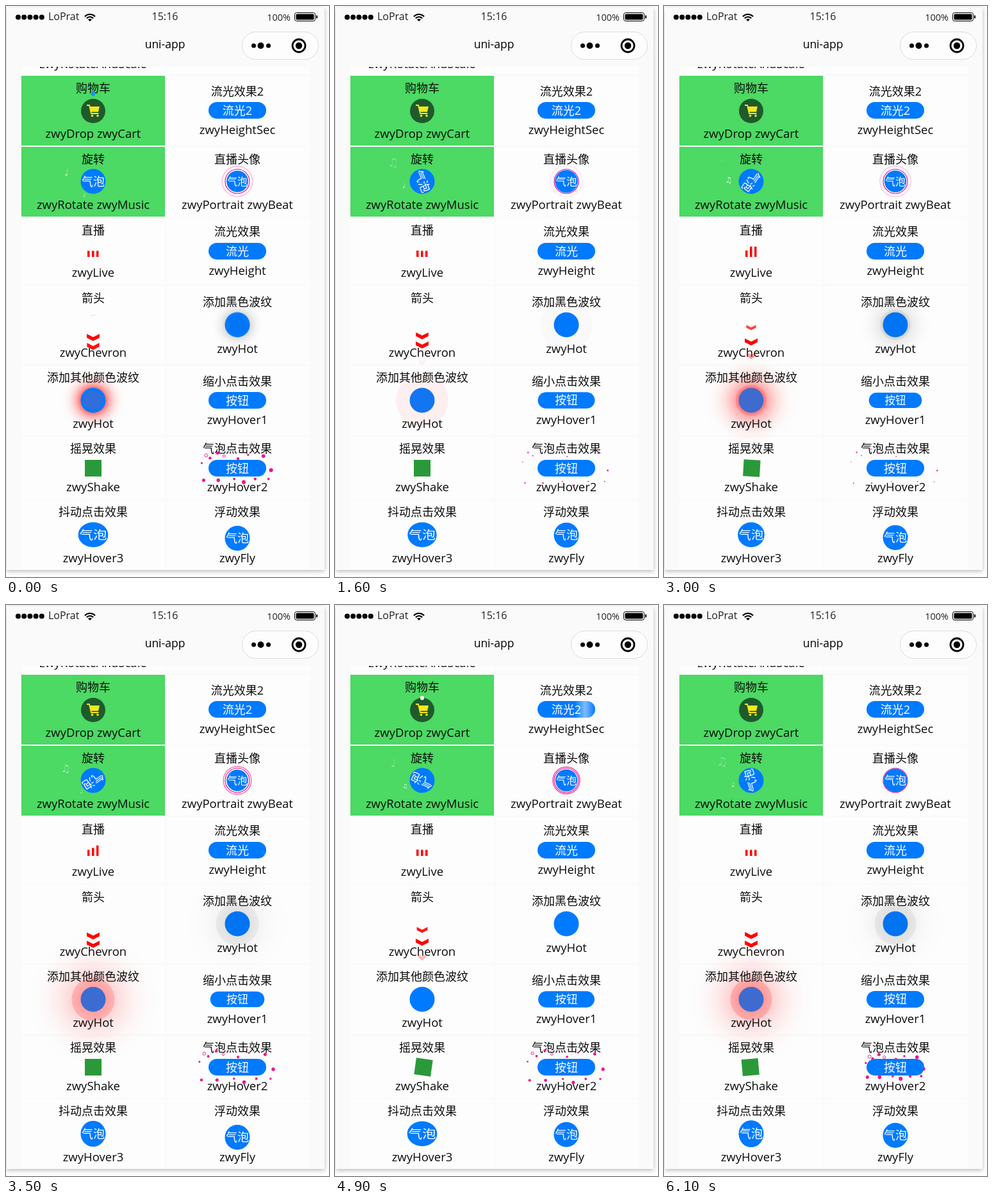
An HTML page with a canvas that plays this animation: 504x892 px, repeating every 6.2 s.

```html
<!DOCTYPE html>
<html lang="zh-CN">
<head>
<meta charset="utf-8">
<title>uni-app</title>
<style>
html, body { margin: 0; width: 100%; height: 100%; overflow: hidden; background: #fff; }
canvas { display: block; }
</style>
</head>
<body>
<canvas id="stage" width="504" height="892"></canvas>
<script>
const g = document.getElementById('stage').getContext('2d');
const LOOP = 6200, STEP = 100, TAU = Math.PI * 2;
const BLUE = '#007aff', RED = '#f00', PINK = '#f0148c', LEFT = 136, RIGHT = 361;
const FONT = '"Open Sans", "Noto Sans CJK SC", "Noto Sans CJK", sans-serif';

// title, title y, caption, caption y
const leftCells = [
  ['购物车', 128, 'zwyDrop zwyCart', 200],
  ['旋转', 239, 'zwyRotate zwyMusic', 311],
  ['直播', 350, 'zwyLive', 417],
  ['箭头', 456, 'zwyChevron', 542],
  ['添加其他颜色波纹', 580, 'zwyHot', 653],
  ['摇晃效果', 691, 'zwyShake', 752],
  ['抖动点击效果', 790, 'zwyHover3', 863]
];
const rightCells = [
  ['流光效果2', 133, 'zwyHeightSec', 194],
  ['直播头像', 239, 'zwyPortrait zwyBeat', 311],
  ['流光效果', 352, 'zwyHeight', 414],
  ['添加黑色波纹', 462, 'zwyHot', 536],
  ['缩小点击效果', 586, 'zwyHover1', 647],
  ['气泡点击效果', 691, 'zwyHover2', 752],
  ['浮动效果', 790, 'zwyFly', 863]
];
const rowEdges = [109, 220, 331, 437, 562, 673, 772, 883];

// bubble x, y, relative size
const bubbles = [
  [312, 702, -1], [318, 706, .8], [330, 698, .9], [340, 703, -.8], [362, 707, .8],
  [378, 701, .6], [402, 703, 1], [414, 725, 1.1], [410, 739, .7], [389, 739, .8],
  [371, 744, 1.1], [356, 739, .7], [331, 741, 1], [308, 741, .9], [305, 714, .6]
];

const clamp = x => Math.min(1, Math.max(0, x));
const mix = (a, b, x) => a + (b - a) * x;
const easeOut = x => 1 - (1 - x) ** 1.7;
const phase = (t, period, offset = 0) => (t / period + offset) % 1;

function text(s, x, y, size = 18, color = '#0c0c0c', align = 'center', family = FONT) {
  g.font = `${size}px ${family}`;
  g.textAlign = align;
  g.fillStyle = color;
  g.fillText(s, x, y);
}
function disc(x, y, r, color) {
  g.fillStyle = color;
  g.beginPath();
  g.arc(x, y, Math.max(0, r), 0, TAU);
  g.fill();
}
function ring(x, y, r, width, color) {
  g.strokeStyle = color;
  g.lineWidth = width;
  g.beginPath();
  g.arc(x, y, r, 0, TAU);
  g.stroke();
}
function box(x, y, w, h, color, r = 0) {
  g.fillStyle = color;
  g.beginPath();
  g.roundRect(x, y, w, h, r);
  g.fill();
}
function path(points, closed) {
  g.beginPath();
  points.forEach(p => g.lineTo(...p));
  if (closed) g.closePath();
}
function at(x, y, draw, sx = 1, sy = sx, angle = 0) {
  g.save();
  g.translate(x, y);
  g.rotate(angle);
  g.scale(sx, sy);
  draw();
  g.restore();
}
function badge() {
  disc(0, 0, 19.5, BLUE);
  text('气泡', 0, 6.5, 18, '#fff');
}
function button(label, y, scale = 1) {
  at(RIGHT, y, () => {
    box(-45, -13, 90, 26, BLUE, 13);
    text(label, 0, 6.5, 18, '#fff');
  }, scale);
}

function page() {
  g.fillStyle = '#fff';
  g.fillRect(0, 0, 504, 892);
  g.save();
  g.shadowColor = 'rgba(0,0,0,.28)';
  g.shadowBlur = 7;
  g.shadowOffsetY = 2;
  box(1, 2, 496, 879, '#fafafa');
  g.restore();
  for (let i = 0; i < 7; i++) {
    const y = rowEdges[i], h = Math.min(rowEdges[i + 1] - 2, 881) - y;
    box(24, y, 224, h, i < 2 ? '#4cd964' : '#fdfdfd');
    box(250, y, 224, h, '#fdfdfd');
  }
  box(24, 95, 224, 12, '#fdfdfd');
  box(250, 95, 224, 12, '#fdfdfd');
}

function header() {
  text('zwyRotateAndScale', LEFT, 96.5, 18.5);
  box(1, 2, 496, 93, '#fafafa');
  for (let i = 0; i < 5; i++) disc(19 + i * 9.2, 17.5, 4, '#000');
  text('LoPrat', 66, 22, 16, '#222', 'left');
  for (const r of [4, 8, 12]) {
    g.strokeStyle = '#000';
    g.lineWidth = r === 4 ? 4 : 2.2;
    g.beginPath();
    g.arc(131, 24, r === 4 ? 2 : r - 1, -Math.PI * .76, -Math.PI * .24);
    g.stroke();
  }
  text('15:16', 248, 22, 16, '#222');
  text('100%', 444, 22.5, 14.5, '#222', 'right');
  g.strokeStyle = '#000';
  g.lineWidth = 1;
  g.beginPath();
  g.roundRect(450.5, 10.5, 32, 13, 3);
  g.stroke();
  box(452.5, 12.5, 28, 9, '#000', 1.5);
  box(484, 14.5, 2, 5, '#000', 1);
  text('uni-app', 248, 66, 17.5, '#000');

  box(368.5, 40.5, 119, 43, '#fdfdfd', 21.5);
  g.strokeStyle = '#dcdcdc';
  g.stroke();
  disc(386.5, 62, 3.5, '#000');
  disc(397.5, 62, 5, '#000');
  disc(409.5, 62, 3.5, '#000');
  ring(457, 62, 10, 2.8, '#000');
  disc(457, 62, 5.2, '#000');
}

// Glow that spreads out, followed by a fading disc over the dot
function ripple(x, y, rgb, strength, spread, p) {
  const color = a => `rgba(${rgb},${a * strength})`;
  const outer = 21 + 210 * p * spread, glow = .95 * clamp(1 - p / .72);
  if (p > .02) {
    const fill = g.createRadialGradient(x, y, 19, x, y, outer);
    for (let i = 0; i <= 6; i++) fill.addColorStop(i / 6, color(glow * (1 - i / 6) ** 3));
    disc(x, y, outer, fill);
  }
  disc(x, y, 19.5, BLUE);
  const veil = Math.min(p * 1.2, .25, .6 * (1 - p) ** 1.5);
  disc(x, y, 42 * (1 - (1 - p) ** 2.5), color(veil));
}

function cart(t) {
  disc(LEFT, 164, 19, '#1f5a2c');
  g.strokeStyle = g.fillStyle = '#f8e71c';
  g.lineWidth = 1.8;
  path([[126, 155], [130, 155], [133, 168], [144.5, 168]]);
  g.stroke();
  path([[130.5, 157], [146, 157], [144, 165.5], [132.5, 165.5]], true);
  g.fill();
  disc(134.5, 171.5, 1.8, '#f8e71c');
  disc(143, 171.5, 1.8, '#f8e71c');
  for (const [start, color] of [[-150, '#1e8ff0'], [2450, '#fff'], [4650, '#fff']]) {
    const p = (t - start) / 400;
    if (p > 0 && p < 1) box(LEFT - 3, mix(124, 160, p) - 4.5, 6, 9 - 4 * p, color, 3);
  }
}

function shine(t) {
  button('流光2', 163);
  const x = 390 + ((t % 2600) - 2300) * .14;
  const fill = g.createLinearGradient(x - 16, 0, x + 16, 0);
  fill.addColorStop(0, 'rgba(255,255,255,0)');
  fill.addColorStop(.5, 'rgba(255,255,255,.5)');
  fill.addColorStop(1, 'rgba(255,255,255,0)');
  box(316, 150, 90, 26, fill, 13);
}

function music(t) {
  ['♫', '♩'].forEach((note, i) => {
    const p = phase(t, 2250, i / 2), size = 6 + 18 * p;
    g.globalAlpha = .95 * clamp(1.5 - 1.7 * p);
    text(note, 122 - 80 * p + 50 * p * p, 296 - 73 * p + size * .36, size, '#fff',
      'center', '"DejaVu Sans", sans-serif');
  });
  g.globalAlpha = 1;
  at(LEFT, 274, badge, 1, 1, t * .0415 * Math.PI / 180);
}

function portrait(t) {
  const p = phase(t, 740, .6);
  g.globalAlpha = clamp(1 - 1.2 * p);
  ring(RIGHT, 274, 19.5 + 7 * p, 1.5, PINK);
  g.globalAlpha = 1;
  ring(RIGHT, 274, 19, 1.2, PINK);
  at(RIGHT, 274, badge, (19 - 2.5 * Math.max(0, Math.sin(Math.PI * p / .9))) / 19.5);
}

function live(t) {
  const p = phase(t, 550);
  [[.68, 3.5], [.55, 8], [.4, 7]].forEach(([peak, swing], i) => {
    const h = 9.5 + swing * Math.max(0, Math.cos(TAU * (p - peak)));
    box(127 + i * 7, 392 - h, 3.5, h, RED);
  });
}

function chevrons(t) {
  for (let i = 0; i < 3; i++) {
    const p = phase(t, 2667, .012 + i / 3), e = easeOut(p * 3 % 1);
    let y = 36 * e, sx = mix(.4, 1, e), sy = sx, alpha = easeOut(clamp(p * 4));
    if (p > 2 / 3) [y, sx, sy, alpha] = [mix(49, 76, e), mix(1, .5, e), 1, 1 - e];
    else if (p > 1 / 3) [y, sx, sy] = [mix(36, 49, e), 1, 1];
    g.globalAlpha = alpha;
    at(LEFT, 481 + y, () => {
      g.fillStyle = RED;
      path([[-10, -5.5], [0, -.5], [10, -5.5], [10, .5], [0, 5.5], [-10, .5]], true);
      g.fill();
    }, sx, sy);
  }
  g.globalAlpha = 1;
}

function burst(t) {
  const q = phase(t, 690, .45);
  const reach = .42 + 1.6 * q - .73 * q * q, size = 2.8 * Math.min(1, (1 - q) * 1.9);
  for (const [x0, y0, s] of bubbles) {
    const x = RIGHT + (x0 - RIGHT) * reach, y = 722 + (y0 - 722) * reach;
    if (s > 0) disc(x, y, size * s, PINK);
    else ring(x, y, -size * s * .9, .9, PINK);
  }
  button('按钮', 722);
}

function shake(t) {
  const keys = [[0, 0], [.2, 8], [.35, -9], [.43, -5], [.506, -9], [.756, 8], [.87, 0], [1, 0]];
  const p = phase(t, 1778), i = keys.findIndex(k => k[0] > p);
  const [from, to] = [keys[i - 1], keys[i]];
  const angle = mix(from[1], to[1], (p - from[0]) / (to[0] - from[0]));
  at(LEFT + angle * .25, 722, () => box(-13, -13, 26, 26, '#2b9939'), 1, 1, angle * Math.PI / 180);
}

function jelly(t) {
  const c = Math.cos(TAU * t * .003065);
  at(LEFT, 826, badge, 1 + .2 * Math.max(0, c), 1 + .25 * Math.max(0, -c));
}

function labels(cells, x) {
  for (const [title, titleY, caption, captionY] of cells) {
    text(title, x, titleY + 6.5);
    text(caption, x, captionY + 6, 18.5);
  }
}

function draw(t) {
  page();
  const spread = phase(t, 2667, .16);
  ripple(RIGHT, 498, '0,0,0', .2, .77, spread);
  ripple(LEFT, 616, '255,60,60', 1, 1, spread);
  labels(leftCells, LEFT);
  labels(rightCells, RIGHT);
  cart(t);
  shine(t);
  music(t);
  portrait(t);
  live(t);
  button('流光', 383);
  chevrons(t);
  button('按钮', 616, .955 + .045 * Math.cos(TAU * t / 555));
  burst(t);
  shake(t);
  jelly(t);
  at(RIGHT, 829 + 2.5 * Math.cos(TAU * t / 3556), badge);
  header();
}

function tick() {
  draw(Math.floor(performance.now() % LOOP / STEP) * STEP);
  requestAnimationFrame(tick);
}
tick();
</script>
</body>
</html>
```
